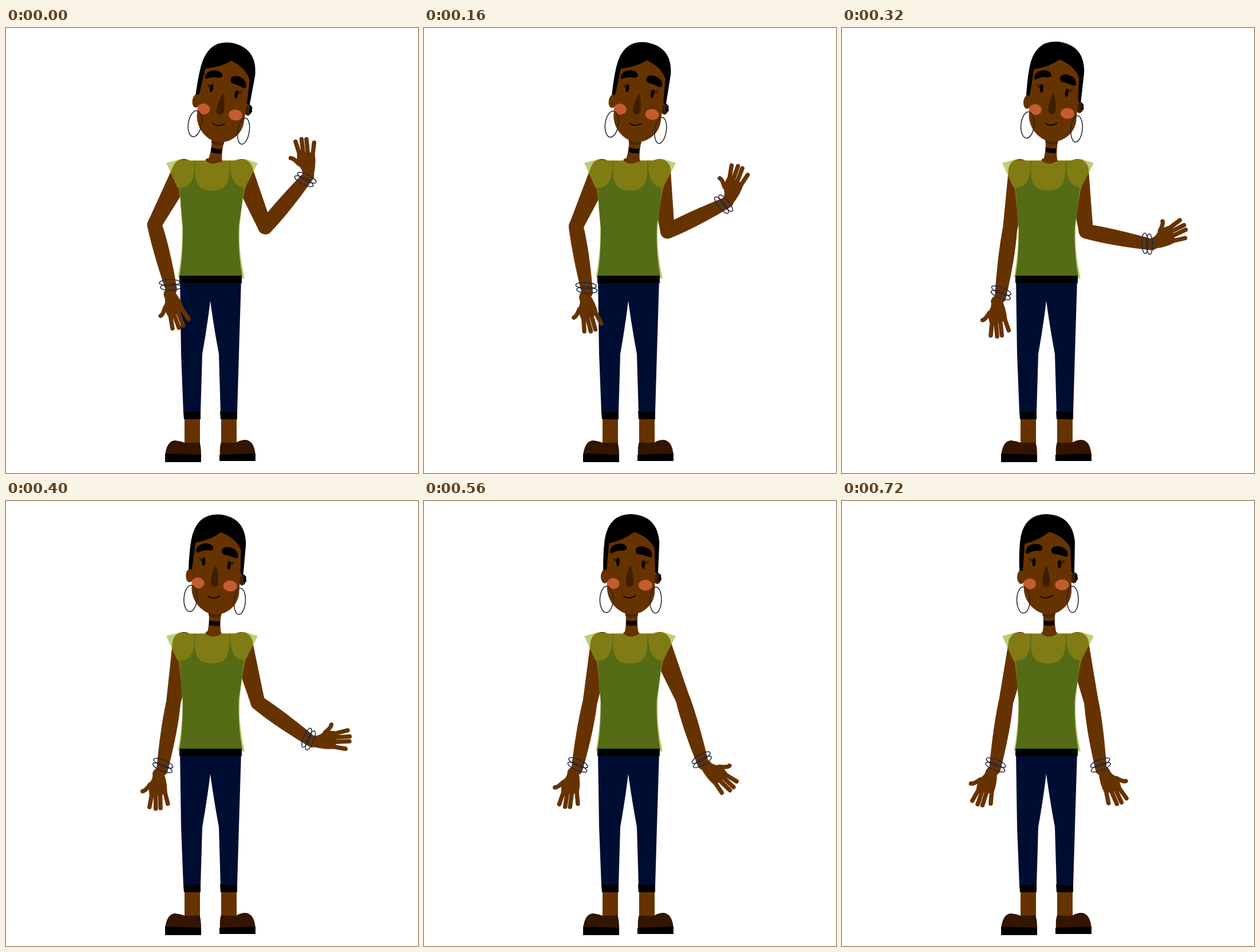
Animation, 720 px wide and 778 px high, one loop 0.76 s. Source, as an HTML page:

```html
<!DOCTYPE html>
<html lang="en">
<head>
<meta charset="utf-8">
<title>Waving woman</title>
<style>
  html, body { margin: 0; height: 100%; overflow: hidden; background: #fff; }
  svg { display: block; width: 100%; height: 100%; }
  .skin { fill: #630; }
  .line { fill: none; stroke: #000; stroke-linecap: round; }
  .fingers { fill: none; stroke: #630; stroke-width: 7.5; stroke-linecap: round; }
  .bangles { fill: none; stroke: #1a2344; stroke-width: 1.5; }
  .hoops { fill: none; stroke: #222; stroke-width: 1.5; }
</style>
</head>
<body>
<svg viewBox="0 0 720 778">
  <!-- legs -->
  <path class="skin" d="M312 680h27v50h-27zM376 680h27v50h-27z"/>
  <path fill="#331500" d="M278 747Q281 722 295 721Q305 722 312 725Q325 726 338 724Q341 731 341 747Z
    M374 747Q373 731 376 724Q388 726 402 725Q410 720 419 720Q434 722 436 747Z"/>
  <path d="M278 744L341 746V759H278ZM373 746L436 744V757H373Z"/>
  <path fill="#000d33" d="M304 440H411L407 570L404 673H375L372 570Q363 522 357 477Q351 526 343 570L340 673H310L306 570Z"/>
  <path d="M310 672L340 670V684H311ZM374 670L404 672V684H375Z"/>
  <path class="line" d="M311 486Q323 484 326 472M389 472Q392 484 404 486"/>

  <!-- torso and arms -->
  <path class="skin" d="M310 232H412V290H310Z"/>
  <g id="leftArm" transform="matrix(-1 0 0 1 722 0)"></g>
  <g id="rightArm"></g>
  <path fill="#93ac21" fill-opacity=".6" d="M280 236L302 230Q325 232 348 231Q362 243 376 231Q400 231 418 229L440 236L419 277L417 284Q408 330 408 370Q409 400 417 438L300 436Q308 400 308 350Q306 315 302 280L299 278Z"/>
  <path fill="#556b16" d="M329 233C331 268 320 279 304 279Q305 315 309 350Q309 400 303 434H413Q405 390 407 345Q413 310 415 278C402 278 391 266 392 233H390C392 268 387 284 360 284C333 284 328 268 331 233Z"/>
  <path d="M303 433H412V446H303Z"/>
  <path class="skin" d="M351 228H373L377 231Q362 243 348 231Z"/>

  <!-- head -->
  <g id="head">
    <path class="skin" d="M350 188H373Q370 215 375 232H350Q354 215 350 188Z"/>
    <path fill="#4d2600" d="M350 196H373L372 201Q361 206 351 201Z"/>
    <path d="M352 209Q361 211 371 209V217Q361 219 353 217Z"/>
    <ellipse class="skin" cx="313" cy="133" rx="7" ry="12"/>
    <ellipse cx="405" cy="134" rx="6.5" ry="10" fill="#3d1e00"/>
    <path d="M408 126Q413 128 411 132Q414 136 410 139L407 137Z"/>
    <path d="M310 122Q309 95 311 72Q316 23 358 23Q403 25 407 72L406 125H399L390 80L361 58L325 80L316 122Z"/>
    <path class="skin" d="M319 75Q346 68 362 54Q389 62 399 82L401 124V160Q399 182 378 194Q361 202 344 194Q322 182 318 158L316 122Z"/>
    <path d="M321 88Q324 75 340 75Q351 76 350.500 84Q348 88 338 87Q329 89 325 92Q320 93 321 88Z
      M366 85Q368 78 378 79Q394 81 395 95Q393 99 386 96Q378 93 371 93Q365 91 366 85Z"/>
    <ellipse cx="335.500" cy="107" rx="3" ry="7.500"/>
    <ellipse cx="380" cy="110.500" rx="3" ry="7.500"/>
    <path class="line" d="M327 101L334 104M329 105L334 106M382 106L389 104M383 108L388 108"/>
    <path fill="#3d1e00" d="M357 112Q350 127 350 145Q356 155 363 147Q364 128 357 112Z"/>
    <g fill="#c45c2f">
      <ellipse cx="328" cy="145" rx="11" ry="9.500"/>
      <ellipse cx="384.500" cy="146.500" rx="12" ry="9.500"/>
    </g>
    <path class="line" stroke-width="1.700" d="M347 167Q357 173 368 165"/>
    <g class="hoops">
      <ellipse cx="317" cy="173" rx="11.500" ry="23"/>
      <ellipse cx="403" cy="172" rx="10" ry="23"/>
    </g>
  </g>
</svg>
<script>
const LOOP = 760, STEP = 40;
const times = [0, 160, 240, 320, 400, 560, 720];

// Angles in degrees at the key times; limbs clockwise from the x axis
const headTilt = [9.4, 8, 6.7, 5.3, 4, 1.4, 0];
const poses = {
  rightArm: {
    upper: [67.4, 82.5, 84.1, 82, 74.6, 67.4, 76.8],
    fore: [-49.9, -25.9, -7.8, 11.5, 35.7, 72.7, 81.8],
    hand: [0, 26.5, 46, 70, 93, 139, 161.5]
  },
  leftArm: {
    upper: [61.8, 65.5, 70.9, 80.7, 80.2, 78.8, 76.9],
    fore: [104.6, 99.6, 92.7, 82, 80.5, 79, 80.7],
    hand: [207, 201, 196, 192, 187, 178, 168]
  }
};

const armMarkup = `<g class="upper">
  <circle class="skin" r="19.500"/>
  <path class="skin" d="M0-19.500L108-12.500V12.500L0 19.500Z"/>
  <g class="fore">
    <circle class="skin" r="12.800"/>
    <path class="skin" d="M0-12.800Q45-15 116-10V10Q45 16 0 12.800Z"/>
    <circle class="skin" cx="117" r="10"/>
    <g class="hand">
      <circle class="skin" cx="-5" cy="2" r="10"/>
      <path class="skin" d="M-15 5Q-14-6-25-14L-25-32Q-9-38 6-33Q9-14 4 5Z"/>
      <path class="fingers" d="M-36-25Q-31-25-22-15M-27.500-54L-20-30M-17-58L-14-32M-8.500-58L-6-32M5-52L2-28"/>
    </g>
    <g class="bangles">
      <ellipse rx="18" ry="5.500" transform="translate(105 0) rotate(77)"/>
      <ellipse rx="18" ry="5.500" transform="translate(113 0) rotate(77)"/>
    </g>
  </g>
</g>`;

// Smooth curve through the key values, at rest at both ends
function sample(values, t) {
  const last = times.length - 1;
  const slope = i => i === 0 || i === last ? 0
    : (values[i + 1] - values[i - 1]) / (times[i + 1] - times[i - 1]);
  let i = 0;
  while (i < last - 1 && t >= times[i + 1]) i++;
  const span = times[i + 1] - times[i], u = (t - times[i]) / span, v = 1 - u;
  return v * v * ((1 + 2 * u) * values[i] + u * span * slope(i))
    + u * u * ((1 + 2 * v) * values[i + 1] - v * span * slope(i + 1));
}

const head = document.getElementById('head');
const arms = Object.entries(poses).map(([id, pose]) => {
  const root = document.getElementById(id);
  root.innerHTML = armMarkup;
  const joint = name => root.querySelector('.' + name);
  return { pose, upper: joint('upper'), fore: joint('fore'), hand: joint('hand') };
});

function place(node, x, y, angle) {
  node.setAttribute('transform', `translate(${x} ${y}) rotate(${angle})`);
}

function draw(now) {
  const t = Math.floor(now % LOOP / STEP) * STEP;
  head.setAttribute('transform', `rotate(${sample(headTilt, t)} 358 250)`);
  for (const { pose, upper, fore, hand } of arms) {
    const a = sample(pose.upper, t), b = sample(pose.fore, t), c = sample(pose.hand, t);
    place(upper, 411.5, 248.5, a);
    place(fore, 108, 0, b - a);
    place(hand, 125, 0, c - b);
  }
}

const start = performance.now();
function tick() {
  draw(performance.now() - start);
  requestAnimationFrame(tick);
}
tick();
</script>
</body>
</html>
```
